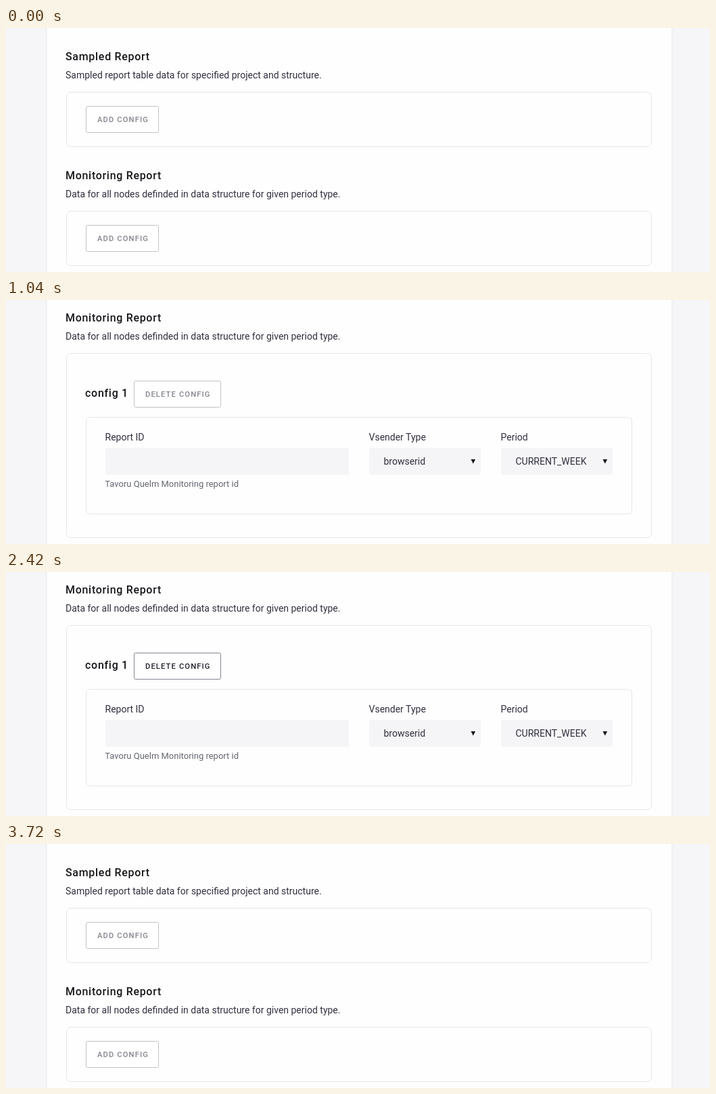
An HTML page for the animation above (4290 ms loop, 1041 by 363 pixels).

```html
<!DOCTYPE html>
<html lang="en">
<head>
<meta charset="utf-8">
<title>Report settings</title>
<style>
  html, body { margin: 0; width: 100%; height: 100%; overflow: hidden; background: #f6f6f9; }
  svg { display: block; }
  text { font: 400 14px Roboto, Arial, sans-serif; fill: #30303f; white-space: pre; }
  .title { font-size: 16px; font-weight: 500; letter-spacing: .7px; fill: #17171c; }
  .hint { font-size: 13px; fill: #646670; }
  .panel { fill: none; stroke: #e6e6ea; }
  .field { fill: #f5f5f7; }
  .arrow { fill: #17171c; }
  .btn text { font-size: 11.2px; font-weight: 500; letter-spacing: 1.12px; fill: #84848e; }
  .btn .edge { fill: #fff; stroke: #c2c2c9; }
  .btn .glow, .btn .ring { fill: none; display: none; }
  .btn .glow { stroke: #9a9aa6; stroke-width: 3; }
  .btn .ring { stroke: #6c98d4; stroke-width: 1.8; }
  .hover text, .focus text { fill: #1f1f2a; }
  .hover .edge { stroke: #85858f; }
  .focus .glow, .focus .ring { display: inline; }
</style>
</head>
<body>
<svg id="stage" width="1041" height="363" viewBox="0 0 1041 363">
  <defs>
    <filter id="soft" x="-20%" y="-20%" width="140%" height="140%"><feGaussianBlur stdDeviation="2.2"/></filter>
    <filter id="cardShade" x="-5%" y="-5%" width="110%" height="110%"><feGaussianBlur stdDeviation="3"/></filter>
  </defs>
  <rect width="1041" height="363" fill="#f6f6f9"/>
  <rect x="61" y="-20" width="923" height="403" fill="#000" opacity=".045" filter="url(#cardShade)"/>
  <rect x="61" y="0" width="923" height="363" fill="#fefefe"/>
  <g id="list"></g>
  <g id="form"></g>
</svg>
<script>
const $ = id => document.getElementById(id);

const text = (x, y, str, cls = '') => `<text x="${x}" y="${y}" class="${cls}">${str}</text>`;

const panel = (x, y, w, h) =>
  `<rect class="panel" x="${x + .5}" y="${y + .5}" width="${w - 1}" height="${h - 1}" rx="6.5"/>`;

const button = (id, x, y, w, label) => `
  <g id="${id}" class="btn">
    <rect class="edge" x="${x + .5}" y="${y + .5}" width="${w - 1}" height="39" rx="2"/>
    <svg x="${x}" y="${y}" width="${w}" height="40" overflow="hidden">
      <rect class="glow" width="${w}" height="40" filter="url(#soft)"/>
    </svg>
    <rect class="ring" x="${x}" y="${y}" width="${w}" height="40" rx="1"/>
    ${text(x + 17, y + 24, label)}
  </g>`;

const heading = (y, title, note) => text(88, y, title, 'title') + text(88, y + 27, note);

const field = (x, w, label) =>
  text(x - .5, 209, label) + `<rect class="field" x="${x}" y="220" width="${w}" height="40" rx="3"/>`;

const select = (x, label, value) =>
  field(x, 165, label) + text(x + 21.5, 245, value) +
  `<path class="arrow" d="M${x + 150.5} 237h6.6l-3.3 6.5z"/>`;

const monitoring = ['Monitoring Report', 'Data for all nodes definded in data structure for given period type.'];

$('list').innerHTML =
  heading(48, 'Sampled Report', 'Sampled report table data for specified project and structure.') +
  panel(89, 95, 866, 82) + button('addSampled', 118, 116, 108, 'ADD CONFIG') +
  heading(225, ...monitoring) +
  panel(89, 272, 866, 82) + button('add', 118, 293, 108, 'ADD CONFIG');

$('form').innerHTML =
  heading(32, ...monitoring) +
  panel(89, 79, 866, 275) +
  text(117, 144, 'config 1', 'title') + button('del', 189, 120, 129, 'DELETE CONFIG') +
  panel(118, 174, 808, 145) +
  field(147, 360, 'Report ID') + text(146.3, 278, 'Tavoru Quelm Monitoring report id', 'hint') +
  select(537, 'Vsender Type', 'browserid') +
  select(732, 'Period', 'CURRENT_WEEK');

// start time, visible view, state of its button
const LOOP = 4290;
const steps = [
  [0, 'list', ''], [390, 'list', 'hover'], [910, 'list', 'focus'],
  [1040, 'form', ''], [1950, 'form', 'hover'], [2730, 'form', 'focus'],
  [2860, 'list', '']
];

function draw(t) {
  const [, view, state] = steps.filter(s => s[0] <= t).pop();
  for (const [id, btn] of [['list', 'add'], ['form', 'del']]) {
    $(id).style.display = id === view ? '' : 'none';
    $(btn).setAttribute('class', 'btn ' + (id === view ? state : ''));
  }
}

let start;
function tick(now) {
  start ??= now;
  draw(Math.max(0, now - start) % LOOP);
  requestAnimationFrame(tick);
}
draw(0);
requestAnimationFrame(tick);
</script>
</body>
</html>
```
